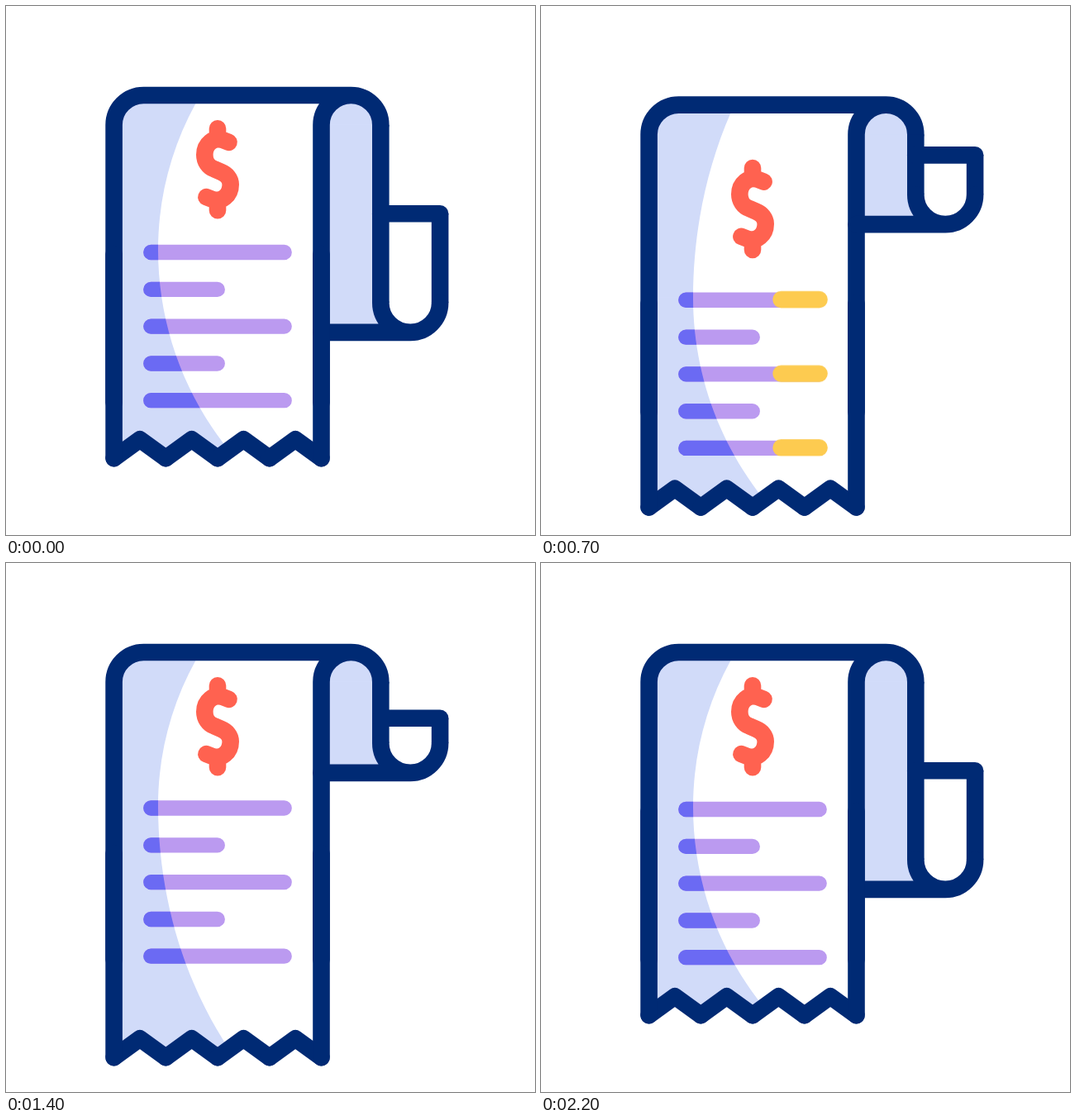
Recreate the animation shown at these times as an HTML page without scripts. Size 640 by 640 pixels, loop 2400 ms.

```html
<!DOCTYPE html>
<html lang="en">
<head>
<meta charset="utf-8">
<title>Receipt roll</title>
<style>
  /* vertical shift of each part, in pixels */
  @property --top { syntax: "<number>"; inherits: true; initial-value: 0; }
  @property --rows { syntax: "<number>"; inherits: true; initial-value: 0; }
  @property --tear { syntax: "<number>"; inherits: true; initial-value: 0; }
  @property --reel { syntax: "<number>"; inherits: true; initial-value: 0; }
  @property --tab { syntax: "<number>"; inherits: true; initial-value: 0; }
  @property --sign { syntax: "<number>"; inherits: true; initial-value: 0; }

  html, body { margin: 0; width: 100%; height: 100%; overflow: hidden; background: #fff; }
  svg {
    --ease: cubic-bezier(.333, 0, .667, 1);
    display: block; width: 100vw; height: 100vh;
    fill: none; stroke-width: 20.6; stroke-linecap: round; stroke-linejoin: round;
    animation: pull 2400ms var(--ease) infinite;
  }
  /* pull the paper down, let it settle, roll it back */
  @keyframes pull {
    0%, 8.333%, 91.667%, 100% { --top: 0; --rows: 0; --tear: 0; --reel: 0; --tab: 0; --sign: 0; }
    33.333% { --top: 12.5; --rows: 62.3; --tear: 64; --reel: -141; --tab: -76.5; --sign: 51.5; }
    58.333%, 75% { --top: 0; --rows: -1.5; --tear: 51; --reel: -141; --tab: -63.5; --sign: 0; }
  }

  .top { transform: translateY(calc(var(--top) * 1px)); }
  .rows { transform: translateY(calc(var(--rows) * 1px)); }
  .tear { transform: translateY(calc(var(--tear) * 1px)); }
  .reel { transform: translateY(calc(var(--reel) * 1px)); }
  .tab { transform: translateY(calc(var(--tab) * 1px)); }
  .sign { transform: translateY(calc(var(--sign) * 1px)); stroke: #ff6250; }

  .navy { stroke: #002a74; }
  .side { fill: #002a74; stroke: none; width: 20.6px; }
  .pale { fill: #d1dbf9; }
  .lines { stroke-width: 18.3; }

  /* parts that stretch between two moving ends */
  .arm { x: 443px; y: calc((143.9 + var(--top)) * 1px); height: calc((215.1 + var(--reel) - var(--top)) * 1px); }
  .edge { x: 514.8px; y: calc((251.3 + var(--tab)) * 1px); height: calc((107.7 + var(--reel) - var(--tab)) * 1px); }
  .back { x: 381.5px; width: 71.8px; y: calc((143.9 + var(--top)) * 1px); height: calc((251 + var(--reel) - var(--top)) * 1px); }
  .shade-upper { transform: translateY(calc((118 + var(--top)) * 1px)) scaleY(calc((177 + var(--rows) - var(--top)) / 177)); }
  .shade-lower { transform: translateY(calc((295 + var(--rows)) * 1px)) scaleY(calc((246 + var(--tear) - var(--rows)) / 246)); }

  /* highlight grows from the left, then leaves to the right */
  .scan {
    stroke: #fdcb50; stroke-width: 20.3; stroke-dasharray: var(--len) 999px; opacity: 0;
    animation: sweep 2400ms var(--ease) var(--start) infinite, show 2400ms step-end var(--start) infinite;
  }
  .long { --len: 161.4px; }
  .short { --len: 80.5px; }
  @keyframes sweep {
    0% { stroke-dashoffset: var(--len); }
    13.333% { stroke-dashoffset: 0px; }
    25%, 100% { stroke-dashoffset: calc(-1 * var(--len)); }
  }
  @keyframes show {
    0%, 25%, 100% { opacity: 0; }
    .8% { opacity: 1; }
  }
</style>
</head>
<body>
<svg viewBox="0 0 640 640">
  <defs>
    <path id="upper" class="shade-upper" d="M130.6-1H230L229.4 0C199.6 54.3 184 115 184 177V178H130.6z"/>
    <path id="lower" class="shade-lower" d="M130.6 0H184C184 90 215.5 177 272.5 246H130.6z"/>
    <clipPath id="shaded"><use href="#upper"/><use href="#lower"/></clipPath>
    <path id="long" d="M175.3 298H336.7m-161.4 89.6h161.4m-161.4 89.6h161.4"/>
    <path id="short" d="M175.3 342.9h80.5m-80.5 89.6h80.5"/>
    <g id="lines" class="rows lines"><use href="#long"/><use href="#short"/></g>
    <path id="tooth" d="M130.6 547.2l31.36-22.8 31.36 22.8"/>
  </defs>

  <g class="pale">
    <use href="#upper"/>
    <use href="#lower"/>
    <path class="top" d="M381.5 160V143.9a35.9 35.9 0 0 1 71.8 0V160z"/>
    <rect class="back"/>
  </g>

  <use href="#lines" stroke="#bb9af0"/>
  <g clip-path="url(#shaded)"><use href="#lines" stroke="#6b6af3"/></g>
  <g class="rows">
    <use href="#long" class="scan long" style="--start: 200ms" y="-.6"/>
    <use href="#short" class="scan short" style="--start: 800ms"/>
    <use href="#long" class="scan long" style="--start: 1600ms" y="-.6"/>
  </g>

  <path class="sign" d="M256 148.3V160M256 236V247.3M269.6 164.8L262.5 162.2C251 158 240.3 167 240.3 180C240.3 188 245 195 252 197.3L260 200.7C267 203.5 271.7 209 271.7 216C271.7 229 261 238 249.5 233.8L242.4 231.2"/>

  <g class="navy">
    <path class="top" d="M130.6 480V143.9a35.9 35.9 0 0 1 35.9-35.9H417.4M381.5 480V143.9a35.9 35.9 0 0 1 71.8 0"/>
    <rect class="side arm"/>
    <rect class="side edge"/>
    <path class="tab" d="M453.3 251.3H525.1"/>
    <path class="reel" d="M453.3 359a35.9 35.9 0 0 0 71.8 0M381.5 394.9H489.2"/>
    <g class="tear" fill="#fff">
      <use href="#tooth"/>
      <use href="#tooth" x="62.72"/>
      <use href="#tooth" x="125.44"/>
      <use href="#tooth" x="188.16"/>
      <path d="M130.6 300V547.2M381.5 300V547.2"/>
    </g>
  </g>
</svg>
</body>
</html>
```
